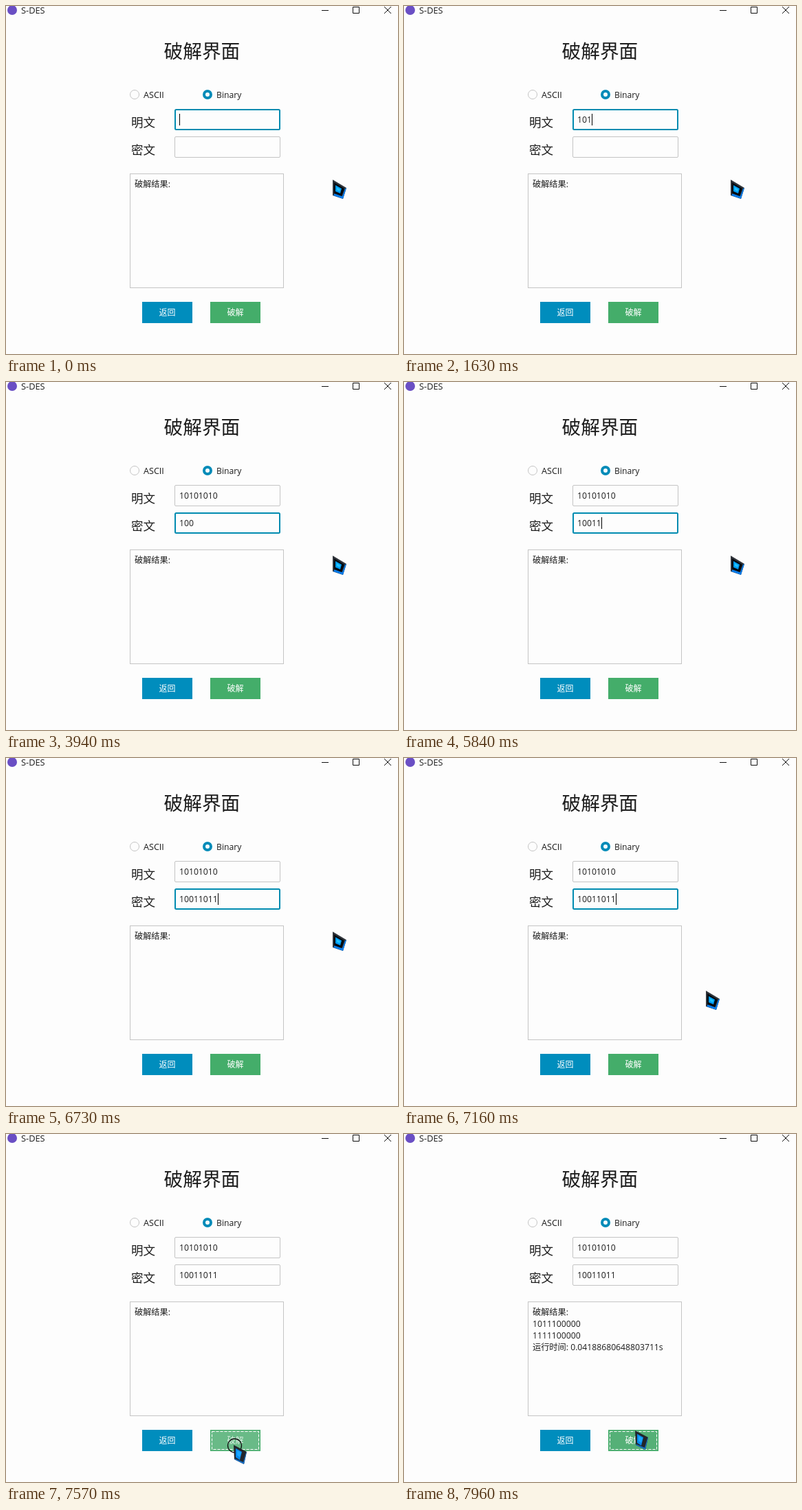
Animation, 570 px wide and 507 px high, one loop 7.99 s. Source, as an HTML page:

```html
<!DOCTYPE html>
<html lang="zh">
<head>
<meta charset="utf-8">
<title>S-DES</title>
<style>
  html, body { margin: 0; width: 100%; height: 100%; overflow: hidden; background: #fdfdfd; }
  svg { display: block; }
  text { font: 12.2px "Open Sans", "Noto Sans CJK SC", "Noto Sans CJK", sans-serif; fill: #1c1c1c; white-space: pre; }
  .title { font-size: 27.7px; }
  .label { font-size: 17.5px; }
  .button { font-size: 12px; fill: #fff; text-anchor: middle; }
  .line { fill: none; stroke: #c4c4c4; }
</style>
</head>
<body>
<svg width="570" height="507" viewBox="0 0 570 507">
  <rect width="570" height="507" fill="#fdfdfd"/>
  <circle cx="9" cy="6" r="7" fill="#6a4fc4"/>
  <text x="22" y="11" style="font-size:12.8px">S-DES</text>
  <path d="M459 6.5h10M504.5 1.5h9v9h-9zM550 1l10 10M560 1l-10 10" fill="none" stroke="#111"/>

  <text class="title" x="229.5" y="76">破解界面</text>

  <circle class="line" cx="187" cy="129" r="6.5"/>
  <text x="200" y="134" style="font-size:12.6px">ASCII</text>
  <circle cx="293" cy="129" r="5" fill="#fff" stroke="#008bb8" stroke-width="4"/>
  <text x="306" y="134">Binary</text>

  <text class="label" x="182" y="175.5">明文</text>
  <text class="label" x="182" y="215.5">密文</text>
  <rect id="box0" rx="1.5"/>
  <rect id="box1" rx="1.5"/>
  <text id="input0" x="252" y="170"></text>
  <text id="input1" x="252" y="210"></text>
  <rect id="caret" width="1" height="17" fill="#000"/>

  <rect class="line" x="180.5" y="244.5" width="223" height="166"/>
  <text x="187" y="264">破解结果:</text>
  <g id="results">
    <text x="187" y="281">1011100000</text>
    <text x="187" y="298">1111100000</text>
    <text x="187" y="315">运行时间: 0.04188680648803711s</text>
  </g>

  <rect x="198" y="431" width="73" height="31" fill="#008dbd"/>
  <text class="button" x="234.5" y="451">返回</text>
  <rect id="crack" x="297" y="431" width="73" height="31"/>
  <g id="focusRing" fill="none">
    <rect x="297.5" y="431.5" width="72" height="30" stroke="#44ad6a"/>
    <rect x="299.5" y="433.5" width="68" height="26" stroke="#fff" stroke-dasharray="4 2"/>
  </g>
  <text class="button" id="crackText" x="333.5" y="451">破解</text>

  <circle id="ripple" cx="332.5" cy="454" r="10" fill="none" stroke="#111" stroke-width="1.3"/>
  <g id="pointer">
    <g id="arrow">
      <path d="M0 0L20 12L15 28L0 23Z" fill="#30343a"/>
      <path d="M1 23L3 20L14 24L18 13L20 12L15 28Z" fill="#087bea"/>
      <path d="M2 4L17 13L13 24L2 20Z" fill="#050a10"/>
      <path d="M4 8L13 13L11 20L4 17Z" fill="#009cf5"/>
      <path d="M6 11L11 14L10 17L6 15Z" fill="#20c5ff"/>
    </g>
    <g id="hand">
      <path d="M0 0L19 10L15 28L1 21Z" fill="#22262c"/>
      <path d="M2 20L14 25L18 11L19 10L15 28L1 21Z" fill="#176fc6"/>
      <path d="M3 5L12 10L9 22L3 18Z" fill="#0789ec"/>
      <path d="M5 8L11 11L9 18L5 15Z" fill="#19a7ff"/>
    </g>
  </g>
</svg>
<script>
const LOOP = 7990, DIGIT = 7;
const $ = id => document.getElementById(id);
const show = (id, visible) => $(id).setAttribute("visibility", visible ? "visible" : "hidden");
const setAll = (id, attrs) => {
  for (const name in attrs) $(id).setAttribute(name, attrs[name]);
};

// Start time, focused field, its text ("|" marks a visible caret)
const typing = [
  [0, 0, "|"], [20, 0, "1|"], [390, 0, "1"], [700, 0, "1|"],
  [1290, 0, "1"], [1400, 0, "10|"], [1520, 0, "10"], [1630, 0, "101|"],
  [1930, 0, "1010|"], [2100, 0, "1010"], [2270, 0, "10101|"], [2440, 0, "101010|"],
  [2600, 0, "101010"], [2770, 0, "1010101|"], [2930, 0, "10101010|"], [3050, 0, "10101010"],
  [3170, 1, "|"], [3420, 1, "1|"], [3730, 1, "10|"], [3840, 1, "100|"],
  [3940, 1, "100"], [4060, 1, "100|"], [4270, 1, "1000|"], [4640, 1, "1000"],
  [4950, 1, "1000|"], [5260, 1, "1000"], [5400, 1, "100|"], [5530, 1, "1001|"],
  [5840, 1, "10011|"], [6180, 1, "10011"], [6360, 1, "100110|"],
  [6550, 1, "1001101|"], [6730, 1, "10011011|"]
];

// Time, x, y of the pointer tip
const path = [
  [7070, 475, 253], [7100, 465, 279], [7160, 439, 338], [7240, 400, 388],
  [7340, 354, 434], [7450, 331, 453], [7690, 331, 453], [7900, 336, 432], [LOOP, 336, 432]
];
const HOVER = 7380, PRESS = 7510, RELEASE = 7660, DONE = 7690;

function pointerAt(t) {
  const next = path.findIndex(p => p[0] > t);
  if (next === 0) return path[0].slice(1);
  const [t0, x0, y0] = path[next - 1], [t1, x1, y1] = path[next];
  const k = (t - t0) / (t1 - t0);
  return [Math.round(x0 + (x1 - x0) * k), Math.round(y0 + (y1 - y0) * k)];
}

function drawBox(index, focused) {
  const inset = focused ? 1 : 0.5;
  setAll("box" + index, {
    x: 245 + inset, y: 150 + 40 * index + inset,
    width: 154 - 2 * inset, height: 31 - 2 * inset,
    fill: "#fdfdfd", stroke: focused ? "#008bb0" : "#c4c4c4", "stroke-width": 2 * inset
  });
}

function render(t) {
  const [, field, typed] = typing.findLast(step => step[0] <= t);
  const text = typed.replace("|", "");
  const pressed = t >= PRESS && t < RELEASE;
  const buttonFocused = t >= PRESS;

  $("input0").textContent = field === 0 ? text : "10101010";
  $("input1").textContent = field === 1 ? text : "";
  drawBox(0, field === 0);
  drawBox(1, field === 1 && !buttonFocused);
  setAll("caret", { x: 252 + DIGIT * text.length, y: 157 + 40 * field });
  show("caret", typed.endsWith("|") && !buttonFocused);

  $("crack").setAttribute("fill", pressed ? "#69ba87" : t >= HOVER ? "#55b077" : "#44ad6a");
  $("crackText").setAttribute("opacity", pressed ? 0.8 : 1);
  show("focusRing", buttonFocused);
  show("results", t >= DONE);
  show("ripple", pressed);

  $("pointer").setAttribute("transform", `translate(${pointerAt(t)})`);
  show("arrow", t < HOVER);
  show("hand", t >= HOVER);
}

const start = performance.now();
function tick() {
  render((performance.now() - start) % LOOP);
  requestAnimationFrame(tick);
}
tick();
</script>
</body>
</html>
```
